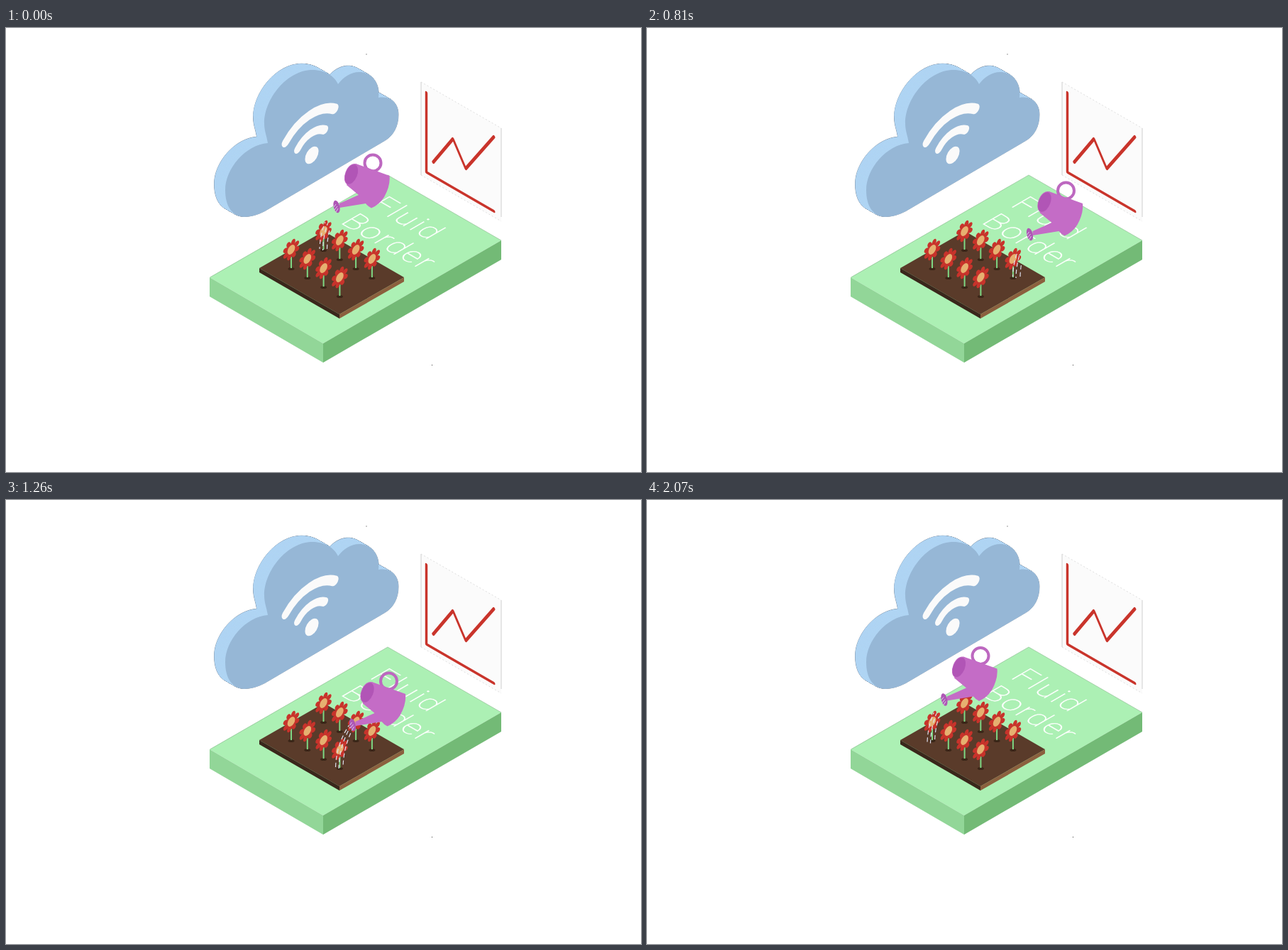
Animation of 895x625 px, one loop 2160 ms. Source, as an HTML page:

```html
<!DOCTYPE html>
<html lang="en">
<head>
<meta charset="utf-8">
<title>Isometric flower bed</title>
<style>
html, body { margin: 0; width: 100%; height: 100%; overflow: hidden; background: #fff; }
svg { display: block; width: 895px; height: 625px; }
.label { font: 100 42px Roboto, Lato, sans-serif; letter-spacing: 2.6px; fill: #fff; stroke: #fff; stroke-width: .6; }
.wifi { fill: none; stroke: #fafafa; stroke-linecap: round; }
.chart { fill: none; stroke: #c9342b; stroke-width: 4; stroke-linecap: round; stroke-linejoin: round; }
.water { fill: none; stroke: #dfe2f1; stroke-width: 1.2; stroke-dasharray: 6 4; }
</style>
</head>
<body>
<svg viewBox="0 0 895 625">
  <defs>
    <path id="cloud" d="M336 265.500C318 265.500 309 250 309 228C309 198 338 164 369 162C367 150 364 145 364 134C364 100 396 59 432 59C450 59 463 68 468 79C476 68 488 61 500 62C517 64 527 79 525 98C543 95 553 107 553 122C553 138 546 152 533 159L365 257.500Q350 265.500 336 265.500Z"/>
    <g id="flower">
      <ellipse cy="27" rx="4.5" ry="2" fill="#3a2618"/>
      <path d="M0 10V26" stroke="#7ed783" stroke-width="2"/>
      <g id="bloom" transform="matrix(.866 -.5 0 1 0 0)"></g>
    </g>
    <clipPath id="wet"><path d="M357 338L448 286 561 351 470 403Z"/></clipPath>
  </defs>

  <g id="cloudSide"></g>
  <use href="#cloud" fill="#96b7d6"/>
  <g class="wifi" transform="matrix(.866 -.5 0 1 431 179)">
    <circle r="11" fill="#fafafa" stroke="none"/>
    <path d="M-23 -20A32 32 0 0 1 21 -25" stroke-width="11.5"/>
    <path d="M-42.500 -39.500A60 60 0 0 1 37 -46.500" stroke-width="13"/>
  </g>

  <path d="M585 76L698 141V272L585 207Z" fill="#fbfbfb"/>
  <path d="M585 76V207M698 141V266" stroke="#cfcfcf"/>
  <path d="M585 76L698 141M585 207L698 272" stroke="#dedede" stroke-dasharray="2 3"/>
  <g class="chart" transform="matrix(.866 .5 0 1 592.5 203)">
    <path d="M0 -112V0H110"/>
    <path d="M11 -19.500L43.300 -68.600 64 -37 110 -105"/>
  </g>

  <path d="M287 351L538 207 698 299 447 444Z" fill="#acf0b4"/>
  <path d="M287 351L447 444V471L287 378Z" fill="#92d698"/>
  <path d="M447 444L698 299V326L447 471Z" fill="#73ba76"/>
  <path d="M287.500 351L538 207 698 299" fill="none" stroke="#86b58c" stroke-width=".6"/>
  <text class="label" transform="matrix(.866 .5 -.866 .5 511 250)">Fluid</text>
  <text class="label" transform="matrix(.866 .5 -.866 .5 470 274)">Border</text>

  <path d="M357 338L448 286 561 351 470 403Z" fill="#5a3b2a"/>
  <path d="M357 338L470 403V409L357 344Z" fill="#3a271b"/>
  <path d="M470 403L561 351V357L470 409Z" fill="#8b603e"/>
  <g id="flowers"></g>

  <g clip-path="url(#wet)">
    <g id="water" class="water">
      <path d="M461 252C449 271 443 288 442 311"/>
      <path d="M463 254C452 274 447 292 446.500 313"/>
      <path d="M466 257C457 276 453 292 452.500 311"/>
    </g>
  </g>
  <g id="can">
    <circle cx="517" cy="190" r="11.5" fill="none" stroke="#bd68c0" stroke-width="4"/>
    <path d="M493 191L540.500 208Q542 222 533 238Q526 249 515 253.500Q510 251 507 247L470 253V247L497 235 480 221Z" fill="#c46cc6"/>
    <ellipse cx="487.5" cy="206" rx="9.5" ry="15.8" transform="rotate(22 487.5 206)" fill="#c46cc6"/>
    <ellipse cx="486.8" cy="206" rx="8.2" ry="14.5" transform="rotate(22 486.8 206)" fill="#b155b6"/>
    <ellipse cx="466" cy="251.5" rx="4.2" ry="9" transform="rotate(-14 466 251.5)" fill="#ae57b5"/>
    <path d="M462 252L465 248M463 256L467 251M465 259L468 254" stroke="#dccdec"/>
  </g>
  <path d="M507.500 37h1M600 474.500h1" stroke="#333"/>
</svg>
<script>
const $ = id => document.getElementById(id);
const add = (parent, tag, attrs) => {
  const node = document.createElementNS("http://www.w3.org/2000/svg", tag);
  for (const key in attrs) node.setAttribute(key, attrs[key]);
  return parent.appendChild(node);
};

// The cloud's thickness: an outlined sweep, then a plain one over it.
for (const stroke of ["#66788c", "none"]) {
  for (let x = 15.5; x >= 0; x -= .5) {
    add($("cloudSide"), "use", { href: "#cloud", x: -x, y: -x * .565, fill: "#afd4f3", stroke, "stroke-width": .7 });
  }
}

for (let a = 0; a < 360; a += 45) {
  add($("bloom"), "ellipse", { cx: 9, rx: 4.8, ry: 3.5, transform: `rotate(${a + 20})`, fill: "#c8332b" });
}
add($("bloom"), "circle", { r: 6.2, fill: "#e6b070" });

for (const [x0, y0] of [[447.5, 286], [402, 312]]) {
  for (let i = 0; i < 4; i++) {
    const x = x0 + 22.8 * i, y = y0 + 13 * i;
    add($("flowers"), "use", { href: "#flower", x, y });
    add($("wet"), "ellipse", { cx: x, cy: y, rx: 11, ry: 13 });
  }
}

// Offsets of the can: down the back row, then back along the front row.
const stops = [
  [0, 0], [24.5, 13], [49, 26], [73.5, 39],
  [22.5, 65], [-1.5, 54.5], [-24.5, 44], [-47, 29.5]
];
const LOOP = 2160, TICK = 90;

function draw(time) {
  const tick = Math.floor(time % LOOP / TICK);
  const move = `translate(${stops[Math.floor(tick / 3)]})`;
  $("can").setAttribute("transform", move);
  $("water").setAttribute("transform", move);
  $("water").setAttribute("stroke-dashoffset", -(tick % 3) * 10 / 3);
}

const start = performance.now();
function loop() {
  draw(performance.now() - start);
  requestAnimationFrame(loop);
}
draw(0);
loop();
</script>
</body>
</html>
```
